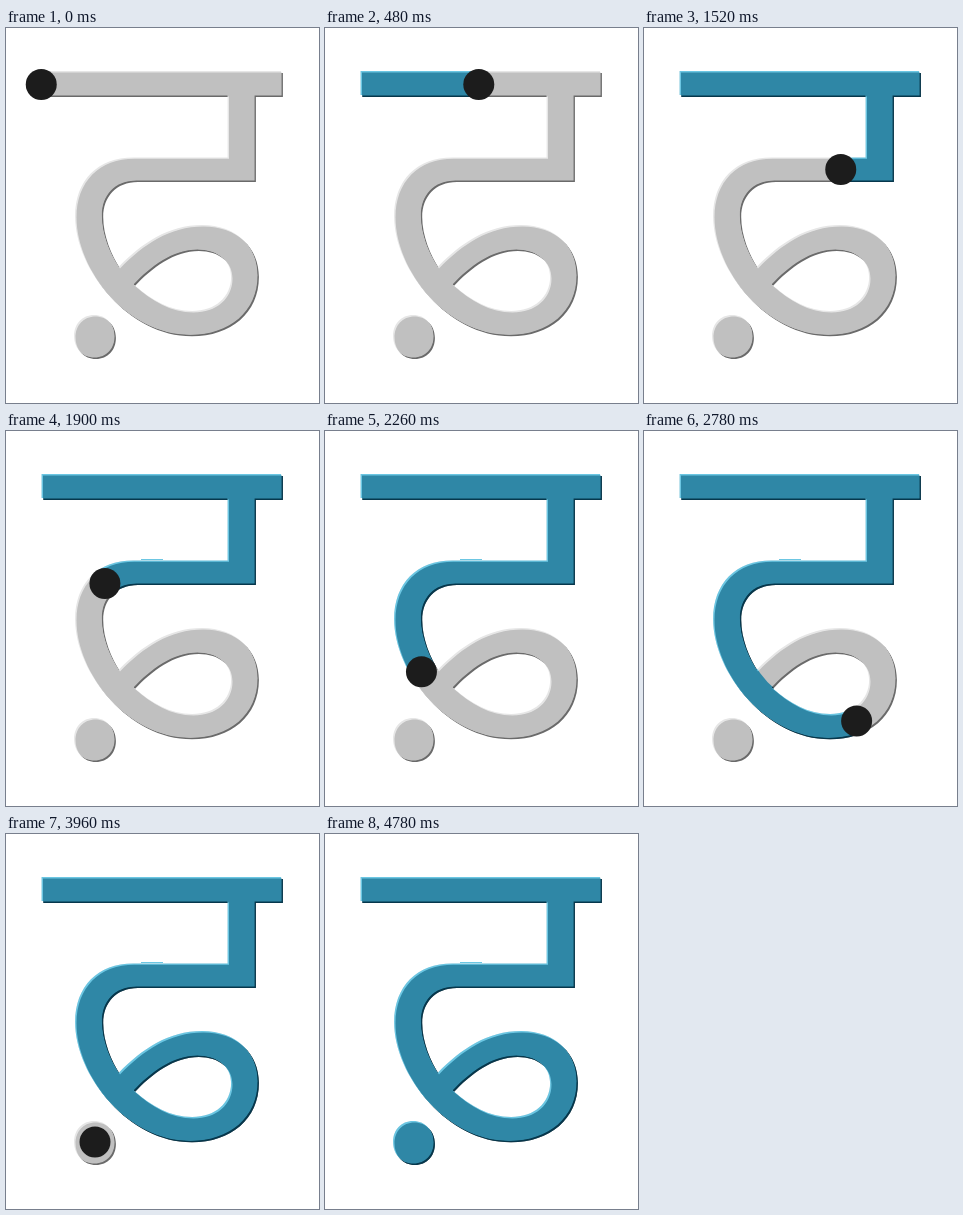
An HTML page for the animation above (4.8 s loop, 313x375 px).

```html
<!DOCTYPE html>
<html>
<head>
<meta charset="utf-8">
<style>
html, body { margin: 0; width: 100%; height: 100%; overflow: hidden; background: #fff; }
svg { display: block; width: 313px; height: 375px; }
.grey { --light: #e6e6e6; --dark: #6a6a6a; --body: #c0c0c0; }
.blue { --light: #6cc6e2; --dark: #06374c; --body: #2f87a6; }
.light { fill: var(--light); }
.dark { fill: var(--dark); }
.body { fill: var(--body); }
#mask path { fill: none; stroke: #fff; }
</style>
</head>
<body>
<svg viewBox="0 0 313 375">
  <defs>
    <path id="glyph" fill-rule="evenodd" clip-rule="evenodd" d="M36.5 44H276V68H249V153H131C109 153 96.3 168 96.3 188C96.3 207 104.5 226 113.5 240C137 216 163 198 197 198C231 198 252 219 252 248C252 284 224 307.3 185 307.3C122 307.3 70 242 70 189C70 153 93 130.3 128 130.3H222.5V68H36.5Z
      M128 257C146 273 165 284 187 284C210 284 226 270 226 250C226 233 212 222 192 222C167 222 145 239 128 257Z
      M89 288C101 288 109 297 109 309S101 330 89 330S69 321 69 309S77 288 89 288Z"/>
    <clipPath id="inset"><use href="#glyph" x="-0.5" y="-0.5"/></clipPath>
    <g id="bevelled">
      <use href="#glyph" class="dark" x="0.9" y="0.9"/>
      <use href="#glyph" class="light" x="-0.9" y="-0.9"/>
      <g clip-path="url(#inset)"><use href="#glyph" class="body" x="0.5" y="0.5"/></g>
    </g>
    <mask id="mask" maskUnits="userSpaceOnUse" x="0" y="0" width="313" height="375">
      <path id="bar" stroke-width="35" d="M35 56.5H277"/>
      <path id="curve" stroke-width="32" d="M235.5 57V141.5H128C103 141.5 83 162 83 189C83 209 88 224 96 240C112 270 148 296 185 296C217 296 240 275 240 249C240 224 222 210 195 210C163 210 140 222 119 250"/>
      <circle id="dot" cx="89" cy="309" r="0" fill="#fff"/>
    </mask>
  </defs>
  <use href="#bevelled" class="grey"/>
  <g class="blue" mask="url(#mask)">
    <use href="#bevelled"/>
    <path class="light" d="M135 128H157V129H135Z"/>
  </g>
  <circle id="pen" r="15.5" fill="#1c1c1c"/>
</svg>
<script>
const LOOP = 4800, BAR_END = 980, CURVE_START = 1055, SPEED = 0.2645;
const DOT_START = 3860, DOT_END = 4180, PEN_OFF = 4380;
const el = id => document.getElementById(id);
const bar = el('bar'), curve = el('curve'), dot = el('dot'), pen = el('pen');
const barLen = bar.getTotalLength(), curveLen = curve.getTotalLength();
const curveEnd = CURVE_START + curveLen / SPEED;
const clamp = (v, max) => Math.min(max, Math.max(0, v));
const ramp = (t, a, b) => clamp((t - a) / (b - a), 1);
const mix = (p, q, k) => ({ x: p.x + (q.x - p.x) * k, y: p.y + (q.y - p.y) * k });
const dotPos = { x: 89, y: 308 };

function reveal(path, len) {
  path.style.visibility = len > 0 ? 'visible' : 'hidden';
  path.setAttribute('stroke-dasharray', len + ' 9999');
}

function draw(t) {
  const a = barLen * ramp(t, 0, BAR_END);
  const b = clamp((t - CURVE_START) * SPEED, curveLen);
  reveal(bar, a);
  reveal(curve, b);
  dot.setAttribute('r', 25 * ramp(t, DOT_START, DOT_END));

  // The pen lifts quickly between strokes.
  const p = t < CURVE_START
    ? mix(bar.getPointAtLength(a), curve.getPointAtLength(0), ramp(t, BAR_END, CURVE_START))
    : mix(curve.getPointAtLength(b), dotPos, ramp(t, curveEnd, DOT_START));
  pen.setAttribute('cx', p.x);
  pen.setAttribute('cy', p.y);
  pen.style.visibility = t < PEN_OFF ? 'visible' : 'hidden';
}

const start = performance.now();
function tick() {
  draw((performance.now() - start) % LOOP);
  requestAnimationFrame(tick);
}
tick();
</script>
</body>
</html>
```
